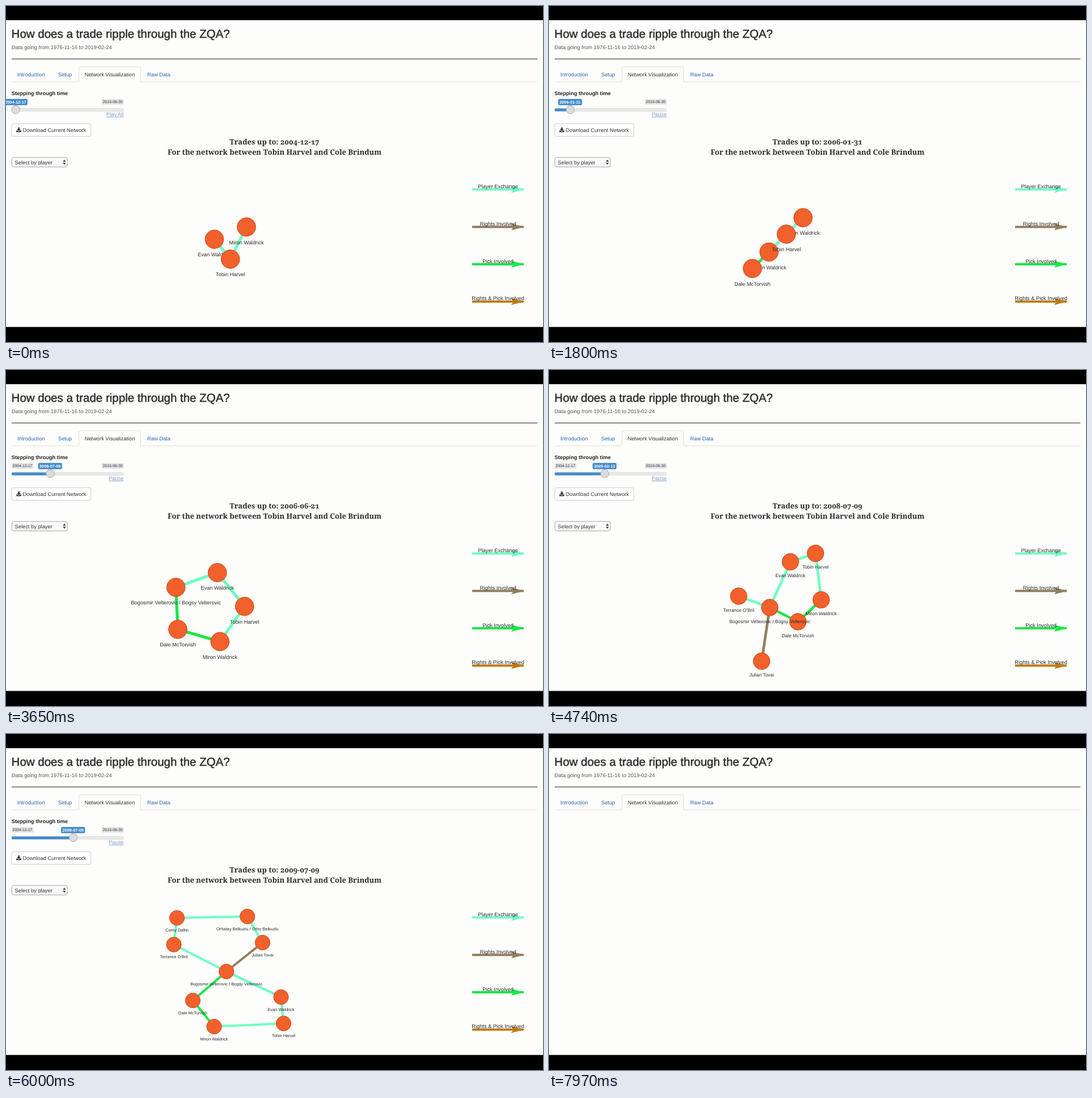
Write an HTML page that moves like this. It is 947 px wide and 592 px high and loops after 8 s.

```html
<!DOCTYPE html>
<html lang="en">
<head>
<meta charset="utf-8">
<title>Trade network</title>
<style>
  html, body { margin: 0; width: 100%; height: 100%; overflow: hidden; background: #000; }
  svg { display: block; width: 947px; height: 592px; font: 9.3px "Liberation Sans", Arial, sans-serif; fill: #333; text-rendering: geometricPrecision; }
  .link { fill: #2f62a8; }
  .bold { font-weight: bold; }
  .mid { text-anchor: middle; }
  .end { text-anchor: end; }
  .caption { font: bold 13px "Noto Serif", serif; font-variant-numeric: oldstyle-nums; text-anchor: middle; fill: #262b28; }
  .graph text { fill: #2b2b2b; text-anchor: middle; }
</style>
</head>
<body>
<svg viewBox="0 0 947 592">
  <rect y="25" width="947" height="540.5" fill="#fdfdfc"/>
  <text x="9.6" y="56" font-size="20.5" fill="#2a2d2b" stroke="#2a2d2b" stroke-width=".5">How does a trade ripple through the ZQA?</text>
  <text x="9.8" y="76" font-size="9.36" fill="#555">Data going from 1976-11-16 to 2019-02-24</text>
  <path d="M10 93.3H937" stroke="#4a4a45" stroke-width="1.3"/>
  <path d="M10 133.7H128.5V110q0-3 3-3H234.500q3 0 3 3V133.700H937" fill="none" stroke="#e1e3d0"/>
  <text class="link" x="20" y="123.700">Introduction</text>
  <text class="link" x="92" y="123.700">Setup</text>
  <text x="138.700" y="123.700">Network Visualization</text>
  <text class="link" x="249" y="123.700">Raw Data</text>
  <g id="content"></g>
</svg>
<script>
const LOOP = 8000;
const AQUA = '#70ffc0', BROWN = '#937f5d', GREEN = '#19e846', GOLD = '#bd7c10';
const dates = ['2004-12-17', '2006-01-31', '2006-06-21', '2008-07-09', '2009-02-13', '2009-07-09', '2010-07-14', '2010-12-18'];

// Listed in drawing order
const players = {
  eric: 'Evan Waldrick', aaron: 'Miron Waldrick', vince: 'Tobin Harvel', jack: 'Dale McTorvish',
  rado: 'Bogosmir Velterovic / Bogsy Velterovic', jerm: "Terrance O'Bril", nate: 'Julian Tovai',
  shawn: 'Corey Daltin', turk: 'Orhatay Belkuzlu / Orho Belkuzlu', last: 'Jordan Pelvick'
};
// Rename the keys to neutral ids: a..j in the same order
const ids = 'abcdefghij';
const names = Object.values(players);
const links = [['ac', AQUA], ['bc', AQUA], ['bd', GREEN], ['de', GREEN], ['ae', AQUA], ['ef', AQUA],
  ['fh', AQUA], ['eg', BROWN], ['hi', AQUA], ['gi', AQUA], ['ij', AQUA]];

const ring = { a: [485, 463.5], b: [367, 515.5], c: [489.5, 510], d: [329.5, 469.5], e: [388.7, 418.5],
  f: [296, 371], g: [452.5, 367.5], h: [301.5, 324], i: [425.7, 321.5] };
const chain = { a: [425.7, 338], b: [480, 405], c: [470, 323], d: [439, 443.5], e: [389.3, 418.5],
  f: [334.5, 398.5], g: [375, 513] };
const graphs = [
  { scale: 1, at: { a: [367.5, 411], b: [424, 389.3], c: [395.7, 446] } },
  { scale: 1, at: { a: [448, 373], b: [388, 433.5], c: [418.5, 402], d: [358.7, 462.5] } },
  { scale: 1, at: { a: [372.7, 357], b: [377.3, 478.5], c: [420.7, 416.5], d: [303, 457], e: [299.7, 383] } },
  { scale: .9, at: chain },
  { scale: .9, at: { ...chain, h: [290.3, 386] } },
  { scale: .8, at: ring },
  { scale: .8, at: { ...ring, j: [505, 325] } }
];

// start time, slider step, graph step, view
const timeline = [
  [0, 0, 0, 'full'], [530, 0, 0, 'full'],
  [1650, 1, 0, 'full'], [1680, 1, 1, 'blank'], [1740, 1, 1, 'panel'], [1800, 1, 1, 'full'],
  [2650, 2, 1, 'full'], [2770, 2, 2, 'full'],
  [3650, 3, 2, 'full'], [3700, 3, 3, 'blank'], [3780, 3, 3, 'panel'], [3870, 3, 3, 'full'],
  [4740, 4, 3, 'full'], [4790, 4, 4, 'blank'], [4870, 4, 4, 'panel'], [4960, 4, 4, 'full'],
  [5830, 5, 4, 'full'], [5870, 5, 5, 'blank'], [5930, 5, 5, 'panel'], [6000, 5, 5, 'full'],
  [6830, 6, 5, 'full'], [6880, 6, 6, 'blank'], [6960, 6, 6, 'panel'], [7050, 6, 6, 'full'],
  [7920, 7, 6, 'full'], [7970, 7, 6, 'blank']
];

const text = (x, y, label, attrs = '') => `<text x="${x}" y="${y}" ${attrs}>${label}</text>`;
const box = (x, y, w, h, r, attrs) => `<rect x="${x}" y="${y}" width="${w}" height="${h}" rx="${r}" ${attrs}/>`;
const badge = (x, date) => box(x, 164, 38.5, 9.7, 1.5, 'fill="#e3e3e3"') +
  text(x + 19.2, 171.3, date, 'class="mid" font-size="6.8"');

function slider(step, playing) {
  const x = 17.2 + 20.26 * step;
  return text(9.8, 157.3, 'Stepping through time', 'class="bold" fill="#222"') +
    (step > 2 ? badge(9.8, dates[0]) : '') + badge(169, '2015-06-30') +
    box(10, 180.5, 197.5, 5, 2, 'fill="#e8e8e8" stroke="#d6d6d6" stroke-width=".6"') +
    box(10, 180.5, x - 10, 5, 2, 'fill="#428bca"') +
    `<circle cx="${x}" cy="182.500" r="7.2" fill="#dcdcdc" stroke="#aaa"/>` +
    box(x - 21.3, 163.7, 42, 11, 2, 'fill="#428bca"') +
    text(x - .3, 171.8, dates[step], 'class="mid bold" font-size="7.3" fill="#fff"') +
    text(207.5, 194, playing ? 'Pause' : 'Play All', 'class="end" fill="#7d9fca" text-decoration="underline"');
}

function panel(step, shown, playing) {
  return slider(step, playing) +
    box(10, 207.5, 139.7, 22, 2.5, 'fill="#fff" stroke="#ccc"') +
    '<path d="M21.300 214h2.600v3h2.300l-3.600 3.500-3.600-3.500h2.300zM18.300 219.300h1.800l2.500 2.200 2.500-2.200h1.800v2.900h-8.600z"/>' +
    text(29.5, 221.8, 'Download Current Network') +
    box(10.3, 266.8, 98, 16.7, 3, 'fill="#fafafa" stroke="#a5a5a5"') +
    text(15.6, 278.5, 'Select by player') +
    '<path d="M100.300 274.200l2.600-3.400 2.600 3.400zM100.300 276.200h5.200l-2.600 3.400z"/>' +
    text(473.5, 243.7, 'Trades up to: ' + dates[shown], 'class="caption"') +
    text(473.5, 262, 'For the network between Tobin Harvel and Cole Brindum', 'class="caption"');
}

function network({ scale, at }) {
  const edges = links.filter(([pair]) => at[pair[0]] && at[pair[1]]).map(([pair, color]) =>
    `<path d="M${at[pair[0]]}L${at[pair[1]]}" stroke="${color}" stroke-width="${5.2 * scale}"/>`);
  const nodes = [...ids].filter(id => at[id]).map(id => {
    const [x, y] = at[id];
    return `<circle cx="${x}" cy="${y}" r="${16.4 * scale}" fill="#f2602c" stroke="#c64a1c"/>` +
      text(x, y + 30.2 * scale, names[ids.indexOf(id)], `font-size="${9.3 * scale}"`);
  });
  return edges.join('') + nodes.join('');
}

const legend = [['Player Exchange', AQUA], ['Rights Involved', BROWN], ['Pick Involved', GREEN], ['Rights &amp; Pick Involved', GOLD]]
  .map(([label, color], i) => {
    const y = 323.3 + 65.85 * i;
    return `<path d="M822 ${y}H913" stroke="${color}" stroke-width="4"/>` +
      `<path d="M914 ${y}l-23 6 4-6-4-6z" fill="${color}"/>` + text(867.6, y - 2.5, label);
  }).join('');

const content = document.getElementById('content');
let current = -1;

function frame(now) {
  const time = now % LOOP;
  const index = timeline.findLastIndex(([start]) => start <= time);
  if (index !== current) {
    current = index;
    const [, step, shown, view] = timeline[index];
    content.innerHTML = (view === 'blank' ? '' : panel(step, shown, index > 0)) +
      (view === 'full' ? `<g class="graph">${network(graphs[shown])}${legend}</g>` : '');
  }
  requestAnimationFrame(frame);
}
requestAnimationFrame(frame);
</script>
</body>
</html>
```
